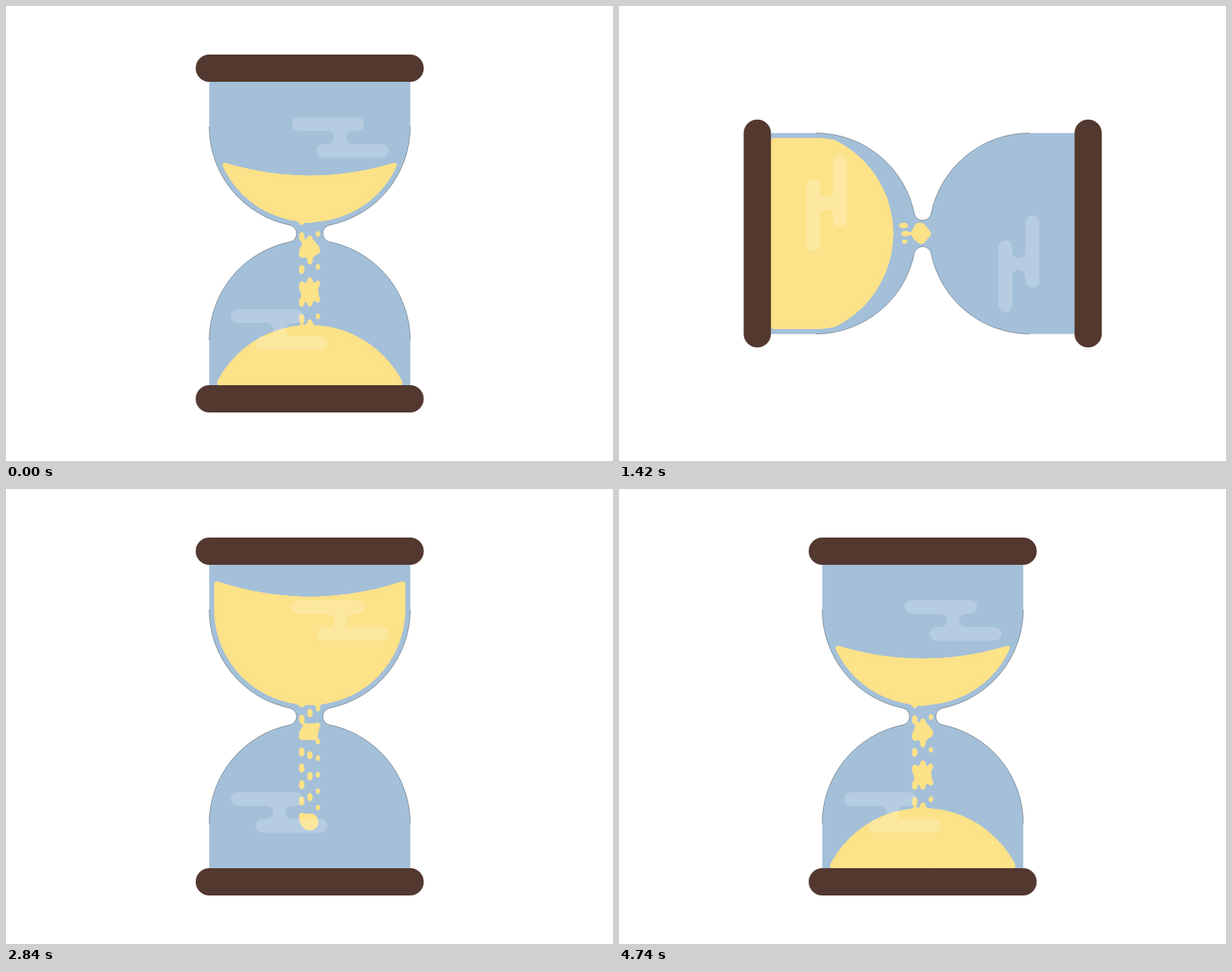
Write an HTML page that moves like this. It is 800 px wide and 600 px high and loops after 4.76 s.

```html
<!DOCTYPE html>
<html lang="en">
<head>
<meta charset="utf-8">
<title>Hourglass</title>
<style>
  html, body { margin: 0; width: 100%; height: 100%; overflow: hidden; background: #fff; }
  svg { display: block; width: 100vw; height: 100vh; }
</style>
</head>
<body>
<svg viewBox="-400.3 -300 800 600">
  <defs>
    <filter id="goo" filterUnits="userSpaceOnUse" x="-160" y="-240" width="320" height="480"
            color-interpolation-filters="sRGB">
      <feGaussianBlur stdDeviation="2.5"/>
      <feColorMatrix values="1 0 0 0 0  0 1 0 0 0  0 0 1 0 0  0 0 0 20 -7.5"/>
    </filter>
    <path id="bulb" d="M-125.4 -200H125.4V-141A125.4 125.4 0 0 1 -125.4 -141Z"/>
    <clipPath id="upper"><use href="#bulb"/></clipPath>
    <clipPath id="lower"><use href="#bulb" transform="rotate(180)"/></clipPath>
    <g id="shine">
      <rect x="-23.5" y="-153.3" width="95" height="18" rx="9"/>
      <rect x="9" y="-118" width="95" height="18" rx="9"/>
      <path d="M23.7 -135.3A8.65 8.65 0 0 1 23.7 -118H56.7A8.65 8.65 0 0 1 56.7 -135.3Z"/>
    </g>
    <rect id="cap" x="-150.3" y="-236" width="300.6" height="36" rx="18"/>
  </defs>

  <g id="hourglass">
    <path id="glass" fill="#a4c0d9"/>
    <path id="outline" fill="none" stroke="#3c4650" stroke-width=".5"/>
    <g filter="url(#goo)" fill="#fce288" stroke="none">
      <g clip-path="url(#upper)"><path id="surface"/></g>
      <g clip-path="url(#lower)"><circle id="dome" r="136.5"/></g>
      <g id="stream" fill="none" stroke="#fce288" stroke-linecap="round"></g>
    </g>
    <g fill="#fff" opacity=".2">
      <use href="#shine"/>
      <use href="#shine" transform="rotate(180)"/>
    </g>
    <g fill="#53382f">
      <use href="#cap"/>
      <use href="#cap" transform="rotate(180)"/>
    </g>
  </g>
</svg>

<script>
const LOOP = 4760, STEP = 20;
const FLOW = 4740;                       // flow time at which the loop closes
const TURN_START = 1006, TURN_END = 1834;
const SOURCE_Y = -29, FLOOR_Y = 206;     // drops live between these heights
const FLOW_END = 6100;

// y0 is the height of the leading drop at flow time 2840
const columns = [
  { x: -10.6, y0: 133, speed: 0.2733, gap: 21.6, width: 5.7, length: 7.6 },
  { x: 0.2, y0: 134, speed: 0.2835, gap: 27.7, width: 5.7, length: 6.6 },
  { x: 10.8, y0: 120, speed: 0.2912, gap: 21.7, width: 5, length: 4.6 }
];
const clumpTimes = [2240, 2665, 3070, 3437, 3905, 4130, 4361, 4565, 4920, 5200, 5680, 6046];
const CLUMP_SPEED = 0.28;

const el = id => document.getElementById(id);
const setPath = (node, d) => node.setAttribute("d", d);

function addStroke(width) {
  const path = document.createElementNS("http://www.w3.org/2000/svg", "path");
  path.setAttribute("stroke-width", width);
  el("stream").append(path);
  return path;
}
columns.forEach(c => c.path = addStroke(c.width));
const clumps = addStroke(22.2);

// One side of the glass, s = 1 right (downwards), s = -1 left (upwards)
function side(s) {
  const big = "A132.5 132.5 0 0 1 ", notch = "A11.35 11.35 0 0 0 ";
  return big + `${26.25 * s} ${-11.1 * s}` + notch + `${26.25 * s} ${11.1 * s}` +
    big + `${132.5 * s} ${141 * s}`;
}
setPath(el("glass"), `M-132.5 -200H132.5V-141${side(1)}V200H-132.5V141${side(-1)}Z`);
setPath(el("outline"), `M132.5 -141${side(1)}M-132.5 141${side(-1)}`);

const easeInOutCubic = p => p < 0.5 ? 4 * p ** 3 : 1 - 4 * (1 - p) ** 3;

const dash = (x, y, length) => `M${x} ${y - length / 2}v${length}`;

function columnPath(c, flow) {
  const head = c.y0 + c.speed * (flow - 2840);
  const top = SOURCE_Y + c.speed * Math.max(0, flow - FLOW_END);
  let d = "";
  for (let i = Math.max(0, Math.ceil((head - FLOOR_Y) / c.gap)); head - i * c.gap >= top; i++) {
    d += dash(c.x, head - i * c.gap, c.length);
  }
  return d;
}

function clumpPath(flow) {
  return clumpTimes
    .map(start => SOURCE_Y + CLUMP_SPEED * (flow - start))
    .filter(y => y >= SOURCE_Y && y <= FLOOR_Y)
    .map(y => dash(0, y, 0.01))
    .join("");
}

function draw(time) {
  const t = Math.floor(time % LOOP / STEP) * STEP;
  const flow = t < TURN_END ? t + FLOW : t;

  const turn = (t - TURN_START) / (TURN_END - TURN_START);
  const angle = turn > 0 && turn < 1 ? 180 * easeInOutCubic(turn) : 0;
  el("hourglass").setAttribute("transform", `rotate(${angle})`);

  const level = 0.043 * (flow - 2840) - 157.5;
  const edge = level - 31.3;
  setPath(el("surface"), level < -15
    ? `M-150 ${edge}A375 375 0 0 0 150 ${edge}V0H-150Z` : "");

  const apex = 121.2 - 0.0577 * (flow - FLOW);
  el("dome").setAttribute("cy", apex + 136.5);

  columns.forEach(c => setPath(c.path, columnPath(c, flow)));
  setPath(clumps, clumpPath(flow));
}

let origin;
function tick(now) {
  origin ??= now;
  draw(now - origin);
  requestAnimationFrame(tick);
}
draw(0);
requestAnimationFrame(tick);
</script>
</body>
</html>
```
